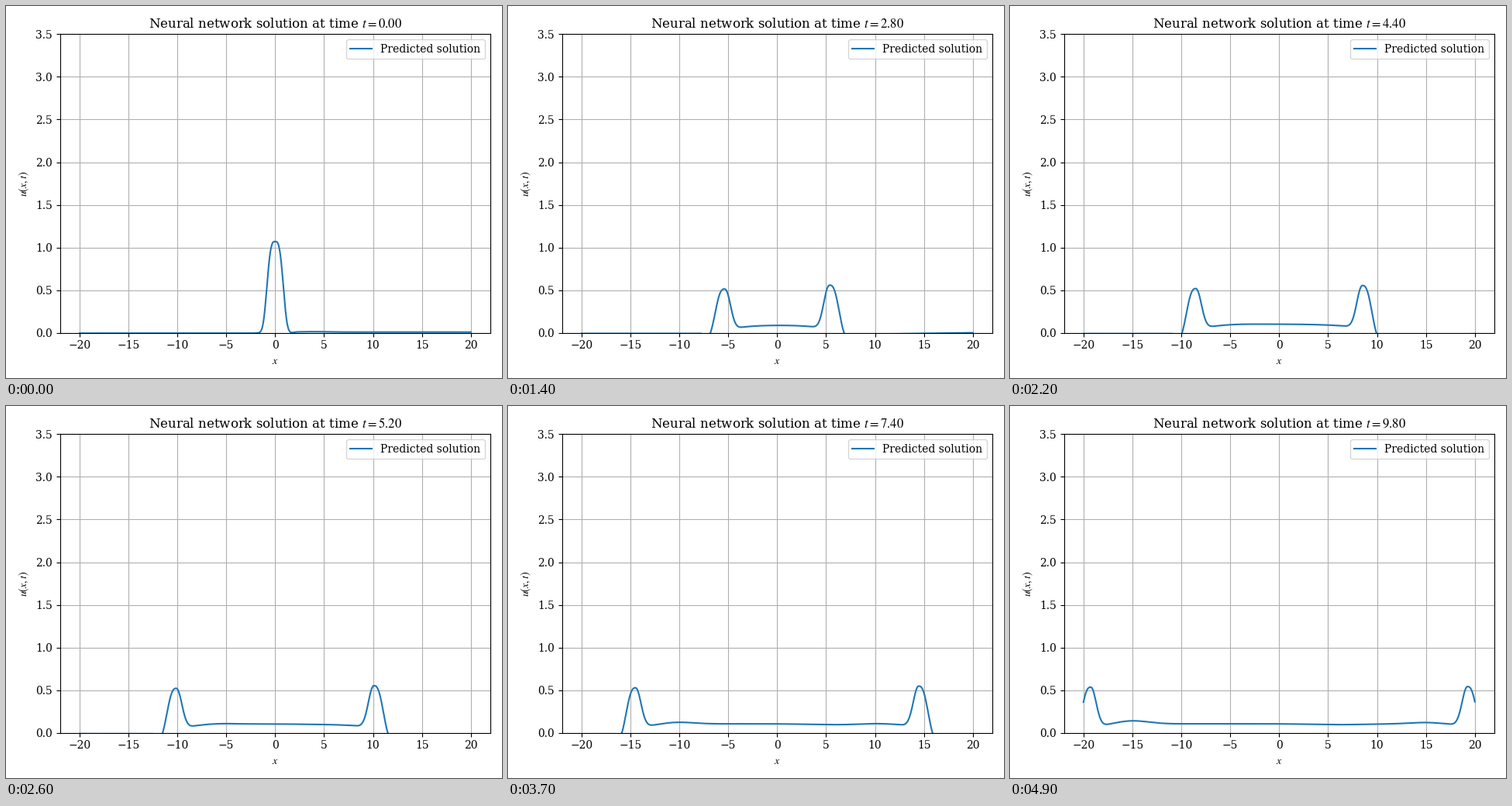
Recreate the animation shown at these times as a matplotlib script. Size 640x480 px, loop 5000 ms.

```python
import numpy as np
import matplotlib.pyplot as plt
from matplotlib.animation import FuncAnimation

plt.rcParams.update({
    "font.family": "DejaVu Serif",
    "mathtext.fontset": "stix",
    "font.size": 10,
})

FRAMES, INTERVAL, DT, SPEED = 50, 100, 0.2, 2.0
x = np.linspace(-20, 20, 1000)


def step(z):
    return 0.5 * (1 + np.tanh(z / 2))


def pulse(r, t, height):
    """Wave travelling along r: steep outer flank, softer inner foot."""
    s = r - SPEED * t + .34 * (1 - np.exp(-t / 3))
    d = np.abs(s)
    undershoot = .15 * (1 - np.exp(-(t / 2.3) ** 2))
    inner_width = .80 + .15 * np.exp(-t / 2.5)
    outer_width = 1.165 - .215 * np.exp(-t)
    inner_power = 2.2 + np.exp(-t / 1.5)
    outer_power = 2.6 + .6 * np.exp(-t)
    inner = height * np.exp(-(d / inner_width) ** inner_power)
    outer = (height + undershoot) * np.exp(-(d / outer_width) ** outer_power)
    outer -= undershoot * np.exp(-(d / 2) ** 8)
    return np.where(s < 0, inner, outer)


def bump(r, t, gain, start):
    depth = SPEED * t - r
    return gain * max(t - start, 0) * np.exp(-((depth - 4.5) / 2.4) ** 2)


def plateau(t):
    """Level stretch left behind, dipping just inside both waves."""
    q = .106 - (.085 - .0055 * t) * np.exp((x - SPEED * t) / 2)
    q -= (.1 - .004 * t) * np.exp((-x - SPEED * t) / 2)
    q -= .01 * np.clip((t - 3) / 4, 0, 1) * np.exp(-((x - 6) / 4) ** 2)
    q += bump(-x, t, .0068, 3.8) + bump(x, t, .0035, 4.7)
    reach = SPEED * t - 1.1
    window = step((reach - x) / .2) * step((reach + x) / .2)
    return (1 - np.exp(-t / 1.2)) * q * window


def far_field(t):
    """Small residue in the region the waves have not reached."""
    front = SPEED * t + 1.9
    right = .009 - .001 * t ** 2 - .0006 * t * (20 - x)
    right += .005 * np.exp(-t - ((x - 4) / 2) ** 2)
    left = -.005 - .001 * t
    return right * step((x - front) / .12) + left * step((-x - front) / .12)


def solution(t):
    waves = pulse(x, t, .565 - .0025 * t) + pulse(-x, t, .505 + .003 * t)
    return waves + plateau(t) + far_field(t)


def title_text(t):
    return f"Neural network solution at time $t={t:.2f}$"


fig, ax = plt.subplots(figsize=(6.4, 4.8), dpi=100)
line, = ax.plot(x, solution(0), label="Predicted solution")
ax.set_xlim(-22, 22)
ax.set_ylim(0, 3.5)
ax.set_xlabel("$x$")
ax.set_ylabel("$u(x,t)$")
title = ax.set_title(title_text(0))
ax.grid(True)
ax.legend(loc="upper right")
# Repeated passes let the layout settle.
for _ in range(3):
    fig.tight_layout()


def update(frame):
    t = frame * DT
    line.set_ydata(solution(t))
    title.set_text(title_text(t))
    return line, title


anim = FuncAnimation(fig, update, frames=FRAMES, interval=INTERVAL,
                     repeat=True, repeat_delay=0, blit=False)
plt.show()
```
